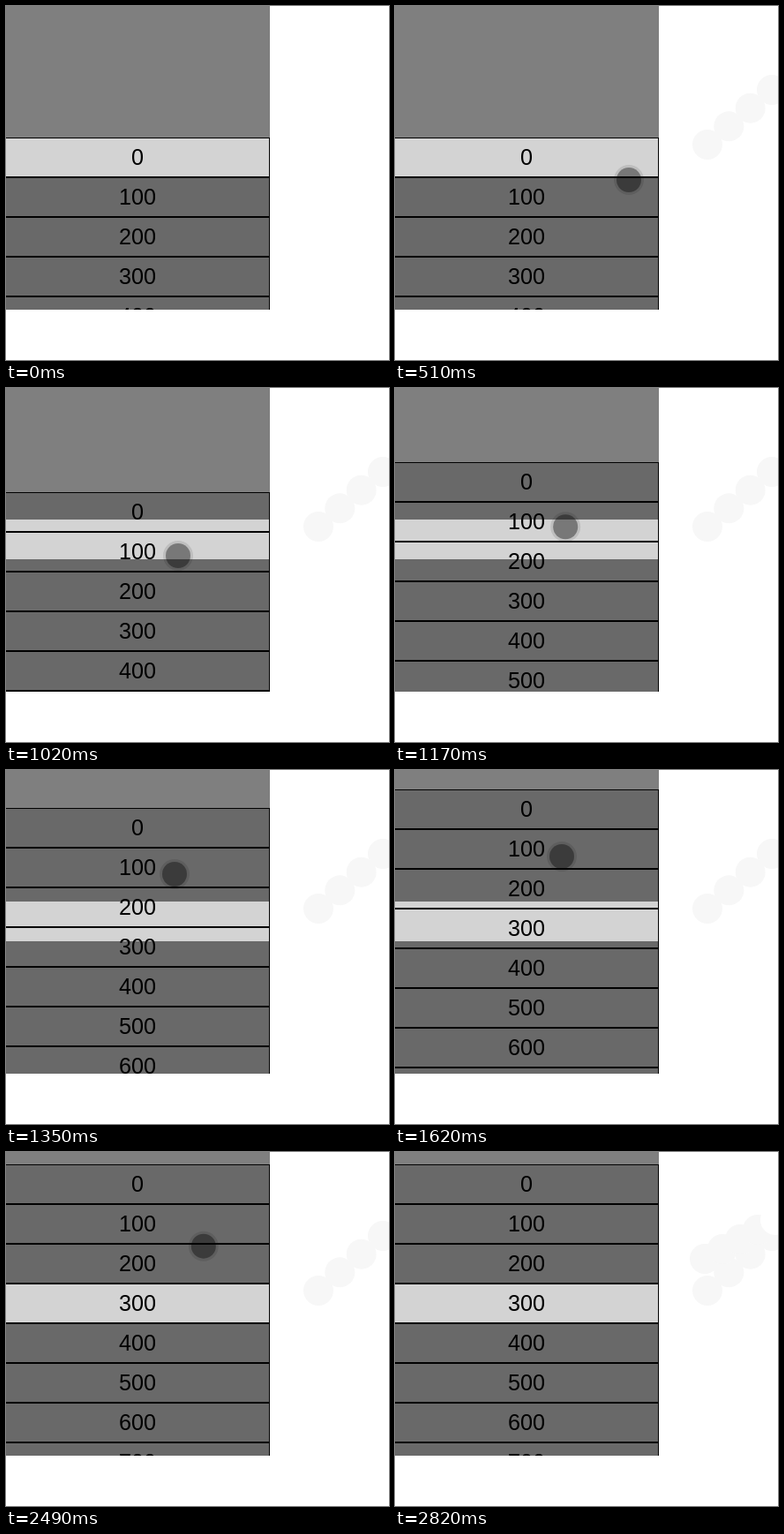
Write an HTML page with a canvas that moves like this. It is 434 by 401 pixels and loops after 3.06 s.

```html
<!DOCTYPE html>
<html lang="en">
<head>
<meta charset="utf-8">
<title>Snapping number picker</title>
<style>
  html, body { margin: 0; width: 100%; height: 100%; overflow: hidden; background: #fff; }
  canvas { display: block; }
</style>
</head>
<body>
<canvas id="stage" width="434" height="401"></canvas>
<script>
const ctx = document.getElementById('stage').getContext('2d');
const LOOP = 3060, STEP = 30;
const ENTER = 330, LEAVE = 2820;
const PANEL = { width: 299, height: 344 };
const ROW = 45, SLOT = 149, RADIUS = 17;

const linear = k => k;
const easeIn = k => k ** 2;
const easeOut = k => 1 - (1 - k) ** 2.5;

// Each key: when, where, and the easing of the way there
const touchPath = [
  { at: ENTER, pos: [427, 95] },
  { at: 420, pos: [354, 157] },
  { at: 450, pos: [281, 178] },
  { at: 510, pos: [265, 197] },
  { at: 750, pos: [206, 223], ease: easeOut },
  { at: 870, pos: [206, 223] },
  { at: 1020, pos: [195, 190] },
  { at: 1350, pos: [191, 118] },
  { at: 1620, pos: [189, 98], ease: easeOut },
  { at: 2250, pos: [189, 98] },
  { at: 2640, pos: [281, 121], ease: easeIn },
  { at: 2670, pos: [351, 121] },
  { at: 2790, pos: [431, 77] }
];

const scrollPath = [
  { at: 870, pos: [SLOT] },
  { at: 1020, pos: [118] },
  { at: 1350, pos: [43] },
  { at: 1620, pos: [22], ease: easeOut }
];

function sample(path, t) {
  const next = path.findIndex(key => key.at > t);
  if (next === 0) return path[0].pos;
  if (next < 0) return path[path.length - 1].pos;
  const from = path[next - 1], to = path[next];
  const k = (to.ease || linear)((t - from.at) / (to.at - from.at));
  return from.pos.map((v, i) => v + (to.pos[i] - v) * k);
}

// After the drag the list snaps onto the slot in hard jumps
function listTop(t) {
  if (t >= 2130) return SLOT - 3 * ROW;
  if (t >= 1950) return 21;
  return Math.round(sample(scrollPath, t)[0]);
}

function disc([x, y], radius, color) {
  ctx.fillStyle = color;
  ctx.beginPath();
  ctx.arc(x, y, radius, 0, Math.PI * 2);
  ctx.fill();
}

function rect(x, y, w, h, color) {
  ctx.fillStyle = color;
  ctx.fillRect(x, y, w, h);
}

// Faint marks the touch point leaves on the white page
function drawTrail(t) {
  for (let s = ENTER; s < Math.min(t, LEAVE - STEP); s += STEP) {
    disc(sample(touchPath, s), RADIUS, '#f7f7f7');
  }
  if (t >= LEAVE) disc(sample(touchPath, LEAVE), RADIUS, '#fff');
}

function drawPicker(top) {
  const { width, height } = PANEL;
  ctx.save();
  ctx.beginPath();
  ctx.rect(0, 0, width, height);
  ctx.clip();
  rect(0, 0, width, height, '#fff');
  ctx.font = '25.2px "Liberation Sans", Arial, sans-serif';
  ctx.textAlign = 'center';
  for (let i = 0, y = top; y < height; i++, y += ROW) {
    rect(0, y, width, ROW, '#000');
    rect(0, y + 1, width - 1, ROW - 2, '#d3d3d3');
    ctx.fillStyle = '#000';
    ctx.fillText(i * 100, 149, y + 31);
  }
  const shade = 'rgba(0, 0, 0, 0.5)';
  rect(0, 0, width, SLOT, shade);
  rect(0, SLOT + ROW, width, height - SLOT - ROW, shade);
  ctx.restore();
}

function drawTouch(t) {
  if (t < ENTER || t >= LEAVE) return;
  const point = sample(touchPath, t);
  disc(point, RADIUS, 'rgba(0, 0, 0, 0.1)');
  disc(point, 14, 'rgba(0, 0, 0, 0.37)');
}

const start = performance.now();

function draw() {
  const elapsed = Math.max(0, performance.now() - start) % LOOP;
  const t = Math.floor(elapsed / STEP) * STEP;
  rect(0, 0, 434, 401, '#fff');
  drawTrail(t);
  drawPicker(listTop(t));
  drawTouch(t);
  requestAnimationFrame(draw);
}
draw();
</script>
</body>
</html>
```
